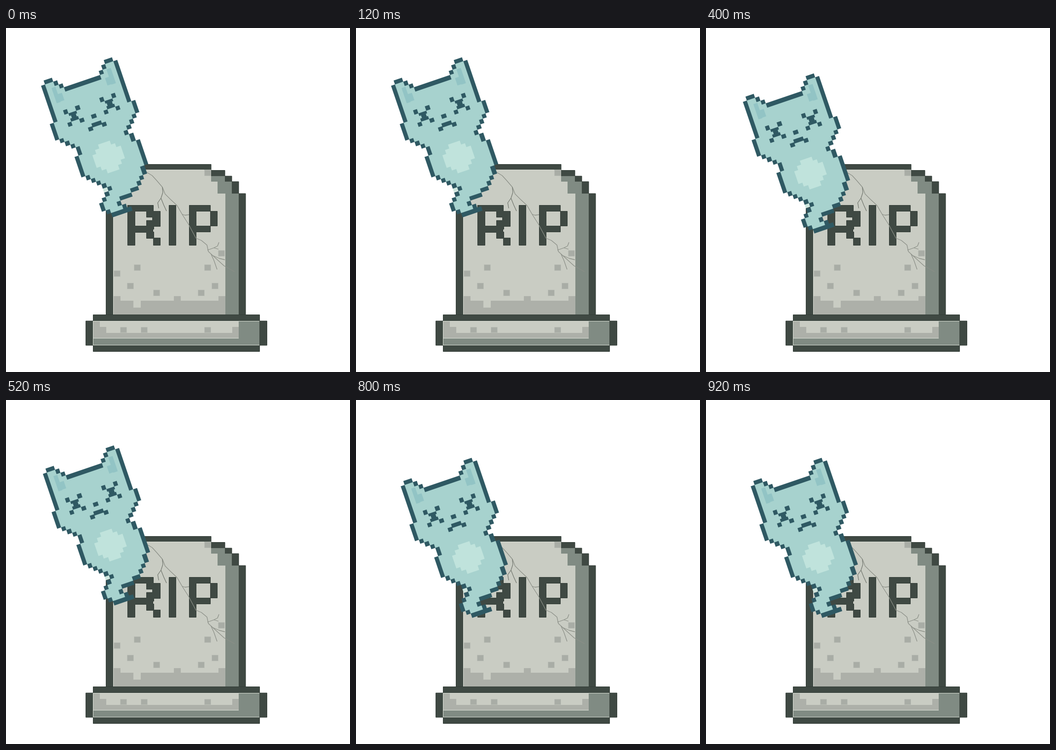
An HTML page that plays this animation: 748x748 px, repeating every 1000 ms.

```html
<!DOCTYPE html>
<html lang="en">
<head>
<meta charset="utf-8">
<title>Ghost cat at a tombstone</title>
<style>
  html, body { margin: 0; width: 100%; height: 100%; overflow: hidden; background: #fff; }
  svg { display: block; width: 100vw; height: 100vh; }
  .dark { fill: #3f4943; stroke: #323c36; }
  .face { fill: #c9ccc3; }
  .mid { fill: #adb0a9; }
  .shade { fill: #808b83; }
  .spot { fill: #a9ada6; stroke: #bcc0b8; }
  .seam { fill: none; stroke: #dfe4da; }
  .crack { fill: none; stroke: #8b8f87; stroke-width: 1.3; stroke-linejoin: round; }
  #cat { animation: sink 1s step-end infinite; }
  @keyframes sink {
    20%  { transform: translate(0, 18px); }
    40%  { transform: translate(4px, 35px); }
    60%  { transform: translate(15px, 49px); }
    80%  { transform: translate(21px, 62px); }
  }
</style>
</head>
<body>
<svg viewBox="0 0 748 748">
  <!-- Slab -->
  <path class="dark" d="M217.5 623.5V360h15v-26h15v-12h15v-12.5h30v-13h153.5v13h30v12.5h15v12h15v26h15v263.5z"/>
  <path class="face" d="M233 623V360h15v-26h15v-12h15v-13.5h168V334h31v289z"/>
  <path class="shade" d="M477 623V360h-17v-26h-14v-12h30v12h15v26h15v263z"/>
  <path class="spot" d="M431.5 308.5h14v13h-14z"/>
  <path class="mid" d="M233 623v-40h16v10h28v15h16v-15h72v-10h15v10h82v-10h15v40z"/>
  <g id="spots"></g>
  <path class="seam" d="M233.5 360V623M303 308.5H431"/>

  <!-- Plinth -->
  <path class="dark" d="M189.5 623.5h362V637h16v53h-16v13.5h-362V690h-16v-53h16z"/>
  <path class="shade" d="M189 637h362v53h-362z"/>
  <path class="mid" d="M189 637h317v38h-317z"/>
  <path class="face" d="M204 637h302v13h-14v13h-274v-13h-14z"/>
  <path class="seam" d="M189.5 690V637.5H551M189 689.5H551M189 674.5H506"/>
  <g id="dents"></g>

  <!-- Letters -->
  <g class="dark" fill-rule="evenodd">
    <path d="M264.5 385.5h56v13h15v33h-14v6h-2v6h2v13h14v16h-15v-15h-15v-13h-25v28h-16zM280.5 398.5v32h25v-12h13v-7h-13v-13z"/>
    <path d="M354.5 385.5h15v87h-15z"/>
    <path d="M398.5 385.5h46v13h15v32h-15v13h-31v29h-15zM413.5 398.5v32h31v-32z"/>
  </g>

  <g class="crack">
    <path d="M305 313l13 8 10 11 12 14 6 15 12 12 14 13 11 19 14 22 16 30 12 5 12 10 3 14 12 11 22 20 23 13"/>
    <path stroke="#737870" d="M340 346l1 12-4 12-7 10 2 12M337 370l6 15 6 13"/>
    <path d="M383 405l6 2 9-1M438 483l14-5 8-4 3-8M452 478l10 3M446 492l6 13 7 20M450 495l14 6 12 3"/>
  </g>

  <g id="cat">
    <g id="cells" transform="translate(76.5 126) rotate(-18.8) scale(9.2 9.42)" shape-rendering="crispEdges"></g>
  </g>
</svg>
<script>
const box = (x, y, w = 1, h = 1) => `M${x} ${y}h${w}v${h}h${-w}z`;
const add = (id, attrs, d) => {
  document.getElementById(id).insertAdjacentHTML('beforeend', `<path ${attrs} d="${d}"/>`);
};
const paint = (fill, d) => add('cells', `fill="${fill}"`, d);

// Column of an edge at a row, along straight lines between [row, column] points
function edge(points, row) {
  const n = points.findIndex(p => p[0] >= row);
  const [r1, c1] = points[n], [r0, c0] = points[n - 1] || [r1 - 1, c1];
  return Math.round(c0 + (c1 - c0) * (row - r0) / (r1 - r0));
}

const left = [[-1, 1], [0, 0], [8, 0], [9, -1], [12, -1], [16, 3], [17, 3], [18, 2],
  [22, 2], [27, 7], [30, 4], [31, 4], [33, 6]];
const right = [[-1, 17], [0, 18], [9, 18], [10, 19], [12, 19], [16, 15], [19, 17],
  [24, 17], [25, 16], [26, 16], [29, 13], [30, 11], [31, 8], [33, 10]];

function inside(col, row) {
  if (row < -1 || row > 33) return false;
  if (row < 2 && Math.abs(col - 9) < 6 - row) return false; // gap between the ears
  return col >= edge(left, row) && col <= edge(right, row);
}

const ink = '#2f5963';
let fur = '', outline = '', belly = '';
for (let row = -1; row <= 33; row++) {
  for (let col = -1; col <= 19; col++) {
    if (!inside(col, row)) continue;
    const core = inside(col - 1, row) && inside(col + 1, row) &&
      inside(col, row - 1) && inside(col, row + 1);
    if (core) fur += box(col, row);
    else outline += box(col, row);
    if (Math.hypot(col - 9, row - 20) < 3.5) belly += box(col + .2, row);
  }
}
paint('#cfe7df', box(6, 26.9));
paint('#a7d2ce', fur);
paint('#c0e3dc', belly);
paint(ink, outline);

// Ears and eyes mirror across the middle of the head
for (const flip of [false, true]) {
  const part = (x, y, w = 1, h = 1) => box(flip ? 19 - x - w : x, y, w, h);
  paint('#92c4c5', part(2.1, 1.2, 1, 3.7) + part(3.1, 3, 1, 1.8));
  let eye = part(4.4, 8.6, 1.2, .8);
  for (const x of [3, 6]) eye += part(x, 7) + part(x, 10);
  for (const y of [8, 9.3]) eye += part(4, y, 2, .7);
  paint(ink, eye + part(7.3, 12.6, 1.1, .9));
}
paint(ink, box(8.9, 10, 1.2) + box(8.3, 11.9, 2.4));

// Worn patches of one size
for (const [x, y] of [[278, 514], [431, 514], [234, 527], [263, 554], [447, 554], [320, 569], [417, 569], [461, 483]]) {
  add('spots', 'class="spot"', box(x + .5, y + .5, 14, 13));
}
for (const x of [248, 293, 431]) add('dents', 'class="spot"', box(x + .5, 650.5, 14, 12));
</script>
</body>
</html>
```
